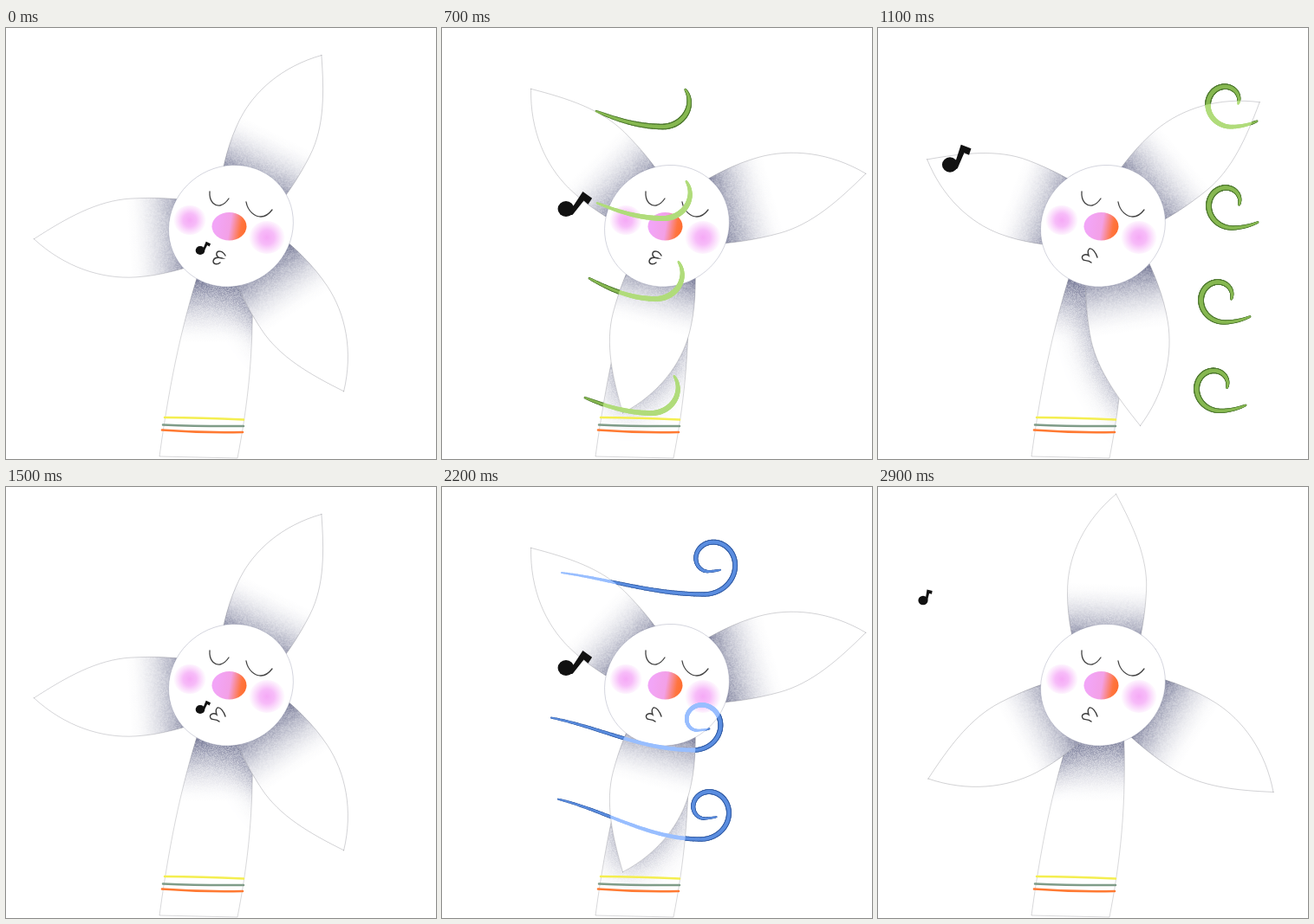
Animation of 496x498 px, one loop 3 s. Source, as an HTML page with a canvas:

```html
<!DOCTYPE html>
<html lang="en">
<head>
<meta charset="utf-8">
<title>Whistling windmill</title>
<style>
  html, body { margin: 0; background: #fff; overflow: hidden; }
  canvas { display: block; }
</style>
</head>
<body>
<canvas id="stage" width="496" height="498"></canvas>
<script>
const canvas = document.getElementById('stage');
const ctx = canvas.getContext('2d');
const TAU = Math.PI * 2;
const SHADE = '112,115,146';
const OUTLINE = 'rgba(70,70,80,.36)';

const bladePath = new Path2D('M0-222C-35-190-51-150-51-113C-51-85-45-60-36-30L30-30C37-60 40-85 40-113C40-150 22-185 0-222Z');
const stemPath = new Path2D('M226 270C205 335 190 400 177 495L267 497C278 440 288 370 283 270Z');
const eyes = new Path2D('M235 189C234 202 242 206 247 205C252 204 255 200 257 197M277 201C279 212 287 218 294 218C300 218 304 214 307 210');
const mouths = [
  new Path2D('M253 263C250 257 244 257 243 260C242 264 246 266 249 266C243 264 239 266 239 270C240 274 245 273 247 271'),
  new Path2D('M253 265C251 259 247 254 244 255C241 257 242 260 243 263C239 260 234 263 236 267C237 270 242 267 246 271')
];
const notePath = new Path2D('M4 12L24-37L43-28L38-16L29-21L14 8Z');

// Key points of the note's flight: step, x, y
const FLIGHT = [[0, 224, 257], [3, 198, 251], [7, 143, 209], [10, 116, 184], [11, 83, 158], [14, 52, 131]];

// Keys: step, x, radius, tightening per quarter turn, tail, head.
// Tail and head: below 0 on the lead-in (100 px units), 0 to 4 quarter turns, above 4 the way out.
// Strands: x offset, y, size, depth of the lead-in, climb per step.
const GUSTS = [
  {
    light: '#b0dc7a', core: '#86b850', edge: '#4f7a30', width: 7,
    keys: [[7, 250, 34, .75, -.77, 1.4], [11, 400, 10.6, 1.3, .75, 4.6]],
    strands: [[5, 114, 1, 30, -4.7], [6, 220, 1, 30, -2], [-3, 313, 1, 40, 2], [-8, 445, 1, 30, -5.4]]
  },
  {
    light: '#98beff', core: '#5a8de0', edge: '#355fa8', width: 6,
    keys: [[18, 200, 120, .75, -1.57, .16], [22, 298, 36, .75, -1.65, 4.3], [25, 361, 56, .5, -.69, 5.4]],
    strands: [[5, 112, 1.1, 14, 3], [-7, 294, .95, 21, 2.5], [1, 397, 1, 26, 2.5]]
  }
];

const mix = (a, b, f) => a.map((v, i) => v + (b[i] - v) * f);

// Values at a step, on straight lines between keys that begin with their step
function between(keys, step) {
  const i = Math.max(0, keys.findIndex(key => key[0] >= step) - 1);
  const [a, b] = [keys[i], keys[i + 1]];
  return mix(a, b, (step - a[0]) / (b[0] - a[0])).slice(1);
}

// White grain laid over the soft shading
function makeGrain() {
  const tile = document.createElement('canvas');
  tile.width = tile.height = 128;
  const g = tile.getContext('2d');
  let seed = 7;
  for (let i = 0; i < 128 * 128; i++) {
    seed = (seed * 16807) % 2147483647;
    g.fillStyle = `rgba(255,255,255,${seed / 2147483647 * .4})`;
    g.fillRect(i % 128, i >> 7, 1, 1);
  }
  return ctx.createPattern(tile, 'repeat');
}
const grain = makeGrain();

function fade(gradient, ...stops) {
  stops.forEach(([pos, color]) => gradient.addColorStop(pos, color));
  return gradient;
}

// Shading that eases out from y0 to y1
function shade(y0, y1) {
  const gradient = ctx.createLinearGradient(0, y0, 0, y1);
  for (let p = 0; p <= 1; p += .125) gradient.addColorStop(p, `rgba(${SHADE},${(1 - p) ** 1.7})`);
  return gradient;
}
const bladeShade = shade(-52, -118);
const stemShade = shade(292, 364);
const noseFill = fade(ctx.createLinearGradient(242, 226, 278, 232), [0, '#f2a5f7'], [.45, '#f3a0e6'], [.8, '#ff7540'], [1, '#ff6c2c']);

function fill(path, ...styles) {
  for (const style of styles) {
    ctx.fillStyle = style;
    ctx.fill(path);
  }
}

function stroke(path, color, width) {
  ctx.strokeStyle = color;
  ctx.lineWidth = width;
  ctx.stroke(path);
}

function ellipse(x, y, rx, ry, turn = 0) {
  const path = new Path2D();
  path.ellipse(x, y, rx, ry, turn, 0, TAU);
  return path;
}

// Three blades a third of a turn apart, each a little longer than the last
function eachBlade(step, paint) {
  for (let i = 0; i < 3; i++) {
    ctx.save();
    ctx.translate(264.5, 230);
    ctx.rotate((26.6 + i * 120 + step * 24) * TAU / 360);
    ctx.scale(1, 1 + i * .024);
    paint();
    ctx.restore();
  }
}

function drawStem(step) {
  fill(stemPath, '#fff', stemShade);
  ctx.save();
  ctx.clip(stemPath);
  ctx.shadowColor = `rgba(${SHADE},.9)`;
  ctx.shadowBlur = 36;
  eachBlade(step, () => fill(bladePath, '#fff'));
  ctx.restore();
  fill(stemPath, grain);
  stroke(stemPath, OUTLINE, .6);
  stroke(new Path2D('M183 450Q225 450 274 452.6'), '#f4ee50', 2.5);
  stroke(new Path2D('M181 458.5Q225 460.5 274 460'), '#7f9c88', 2.5);
  stroke(new Path2D('M180 464.5Q225 468 273 467'), '#ff7a33', 2.6);
}

function drawCheek(x, y, r) {
  const glow = ctx.createRadialGradient(x, y, 0, x, y, r);
  fill(ellipse(x, y, r, r * .9), fade(glow, [0, '#f5a9f6'], [.4, 'rgba(245,172,247,.82)'], [1, 'rgba(246,180,248,0)']));
}

function drawFace(step) {
  const head = ellipse(259.5, 228.7, 73.4, 68.8, -.6);
  fill(head, '#fff');
  stroke(head, 'rgba(120,122,150,.4)', .8);
  drawCheek(212, 222, 19);
  drawCheek(301, 242, 21);
  fill(ellipse(257.5, 229.3, 20, 16.3), noseFill);
  stroke(eyes, '#444', 1.3);
  stroke(mouths[step % 6 < 3 ? 0 : 1], '#3a3a3a', 1.4);
}

// The note swells as it rises, then dwindles away
function drawNote(step) {
  const now = step % 15;
  const [x, y] = between(FLIGHT, now);
  const scale = now <= 10 ? .28 + .72 * (now / 10) ** 2 : 1.7 - .1 * now;
  const radius = 13 * scale ** .7;
  fill(ellipse(x, y, radius, radius * .95), '#111');
  ctx.save();
  ctx.translate(x, y);
  ctx.rotate(.24 * Math.sin(Math.PI * now / 10));
  ctx.scale(scale, scale);
  fill(notePath, '#111');
  ctx.restore();
}

// Before its first key a gust is still emerging; after its last one it thins out from the tail
function gustState(keys, step) {
  const first = keys[0], last = keys[keys.length - 1];
  const early = Math.max(0, first[0] - step), late = Math.max(0, step - last[0]);
  const [x, radius, tighten, tail, head] = between(keys, step + early - late);
  return { x: x - 15 * early + 25 * late, radius, tighten, tail: tail + 2.2 * late, head: head - .7 * early + .5 * late };
}

// A swooping lead-in, then a spiral turn, then a gentle way out
function strandPoints({ x, radius, tighten, tail, head }, y, size, depth) {
  const points = [], du = .03;
  for (let u = tail; u < Math.min(0, head); u += du) {
    points.push([x + 100 * u, y - depth * (1 - Math.cos(Math.PI * u / 2.1))]);
  }
  let heading = 0;
  for (let u = 0; u <= head; u += du) {
    if (u >= tail) points.push([x, y]);
    const turn = u < 4 ? du * Math.PI / 2 : du * 50 / 75;
    const length = u < 4 ? size * radius * tighten ** u * turn : du * 50;
    heading += turn;
    x += length * Math.cos(heading);
    y -= length * Math.sin(heading);
  }
  return points;
}

function drawStrand(points, color, width) {
  ctx.strokeStyle = color;
  for (let i = 1; i < points.length; i++) {
    ctx.lineWidth = width * (.3 + .7 * Math.sin(Math.PI * i / points.length) ** .6);
    ctx.beginPath();
    ctx.moveTo(...points[i - 1]);
    ctx.lineTo(...points[i]);
    ctx.stroke();
  }
}

// Strands are pale over the windmill and deep over the sky
function drawGust({ keys, strands, width, light, core, edge }, step) {
  const state = gustState(keys, step);
  for (const [dx, y, size, depth, climb] of strands) {
    const points = strandPoints({ ...state, x: state.x + dx }, y + climb * (step - keys[0][0]), size, depth);
    ctx.globalCompositeOperation = 'source-atop';
    drawStrand(points, light, width * .9);
    ctx.globalCompositeOperation = 'destination-over';
    drawStrand(points, core, width * .6);
    drawStrand(points, edge, width);
  }
  ctx.globalCompositeOperation = 'source-over';
}

function draw(step) {
  ctx.clearRect(0, 0, 496, 498);
  ctx.lineCap = 'round';
  drawStem(step);
  eachBlade(step, () => {
    fill(bladePath, '#fff', bladeShade, grain);
    stroke(bladePath, OUTLINE, .6);
  });
  drawFace(step);
  drawNote(step);
  drawGust(GUSTS[step < 15 ? 0 : 1], step);
}

function tick() {
  draw(Math.floor(performance.now() % 3000 / 100));
  requestAnimationFrame(tick);
}
tick();
</script>
</body>
</html>
```
